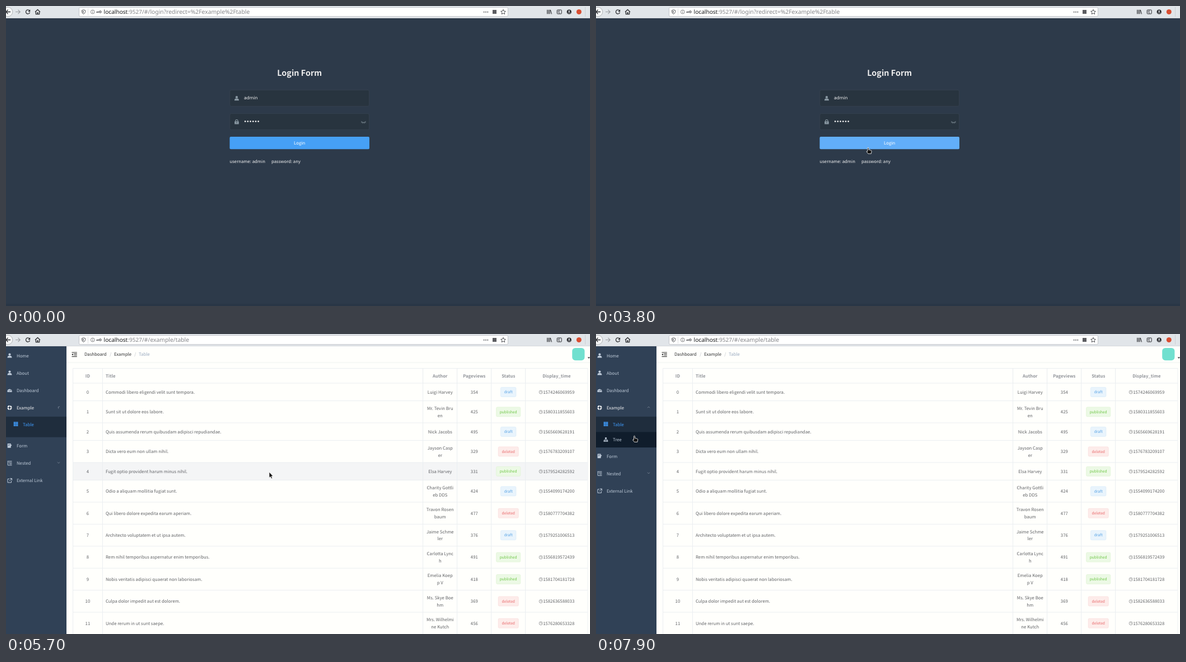
Animation of 1043 by 537 pixels, one loop 8000 ms. Source, as an HTML page:

```html
<!DOCTYPE html>
<html lang="en">
<head>
<meta charset="utf-8">
<title>Login and table</title>
<style>
html, body { margin: 0; width: 100%; height: 100%; overflow: hidden; background: #2d3a4a; }
svg { display: block; width: 100%; height: 100%; }
text { font-family: "Noto Sans CJK SC", "Noto Sans CJK JP", "Noto Sans CJK", "Noto Sans", sans-serif;
  text-rendering: geometricPrecision; white-space: pre; }
.url { font-family: "Noto Sans", sans-serif; }
.field { font-family: "DejaVu Sans", sans-serif; }
</style>
</head>
<body>
<svg id="stage" viewBox="0 0 1043 537"></svg>
<script>
const LOOP = 8000;
const SIZE = 7.77;
const PAGE = '#fffffc';
const LINE = '#ebeef1';

// Markup helpers; text is placed by the middle of its capitals.
const rect = (x, y, w, h, fill, more = '') =>
  `<rect x="${x}" y="${y}" width="${w}" height="${h}" fill="${fill}" ${more}/>`;
const disc = (x, y, r, fill, more = '') => `<circle cx="${x}" cy="${y}" r="${r}" fill="${fill}" ${more}/>`;
const fillPath = (d, fill, more = '') => `<path d="${d}" fill="${fill}" ${more}/>`;
const stroke = (d, color, width = 1, more = '') =>
  `<path d="${d}" fill="none" stroke="${color}" stroke-width="${width}" ${more}/>`;
const text = (x, y, str, fill, size = SIZE, more = '') =>
  `<text x="${x}" y="${y + size * 0.36}" fill="${fill}" font-size="${size}" ${more}>${str}</text>`;
const centered = (x, y, str, fill, size = SIZE, more = '') =>
  text(x, y, str, fill, size, 'text-anchor="middle" ' + more);
const group = (id, body, more = '') => `<g id="${id}" ${more}>${body}</g>`;
const person = (x, y, fill) =>
  disc(x, y - 2, 2.1, fill) + fillPath(`M${x - 4} ${y + 4}q0-3.6 2.8-3.6h2.4q2.8 0 2.8 3.6z`, fill);

function browserBar() {
  const ink = '#2b2c30';
  const url = (id, path) => group(id, text(243, 10.3, path, '#85868a', 10.35, 'class="url"'));
  return rect(0, 0, 1043, 22, '#e1e5e9') + rect(0, 21.4, 1043, 0.6, '#cdd1d5')
    + rect(31, 2, 15, 16, '#c8ccd0', 'id="reloadHover" rx="2"')
    + rect(49, 3, 15, 15, '#c5c8cb', 'id="homeHover" rx="2"')
    + disc(3.5, 10.5, 8.3, '#f5f6f7', 'stroke="#a4a6a9" stroke-width=".8"')
    + stroke('M8 10.5H0M3.5 6.8L-.2 10.5 3.5 14.2', ink, 1.3)
    + stroke('M17 10.5h8M21.5 6.8l3.7 3.7-3.7 3.7', '#9a9da1', 1.2)
    + stroke('M41.9 8.2A3.6 3.6 0 1 0 42.5 11.5', ink, 1.3) + fillPath('M43.2 6.3v4h-4z', ink)
    + stroke('M52 10.8l4.5-4.3 4.5 4.3M53.4 10.5v4.1h6.2v-4.1', ink, 1.3) + rect(55.5, 11, 2, 3.5, ink)
    + rect(130.5, 2.5, 766, 16.2, '#fff', 'rx="2" stroke="#b9bcc0" stroke-width=".8"')
    + stroke('M138.5 6.8l3 1v2.6q0 2.7-3 4-3-1.3-3-4v-2.6z', '#55565a', 1)
    + fillPath('M138.5 8.4v4.5q-1.6-.9-1.6-2.7v-1.3z', '#55565a')
    + stroke('M146.5 4v13', '#d4d5d7', 0.7)
    + disc(154.8, 10.5, 3.4, 'none', 'stroke="#66676a" stroke-width=".8"')
    + stroke('M154.8 9.8v2.7M154.8 8.2v.9', '#66676a', 0.9)
    + disc(168.4, 10.6, 1.7, 'none', 'stroke="#55565a" stroke-width="1.1"')
    + stroke('M166.7 10.6h-4.7v1.7M164.2 10.6v1.5', '#55565a', 1.1)
    + text(174.6, 10.3, 'localhost', '#17181b', 10.1, 'class="url"')
    + text(217.3, 10.3, ':9527', '#85868a', 10, 'class="url"')
    + url('loginUrl', '/#/login?redirect=%2Fexample%2Ftable') + url('tableUrl', '/#/example/table')
    + [853.7, 857, 860.3].map(x => disc(x, 10.7, 1, '#55565a')).join('')
    + rect(869, 7, 7, 7, '#5c5d61')
    + stroke('M888 6.3l1.3 2.8 3 .4-2.2 2.1.6 3-2.7-1.5-2.7 1.5.6-3-2.2-2.1 3-.4z', '#4c4d51', 1)
    + stroke('M966.7 6.8v7.5M968.9 6.8v7.5M971.1 6.8v7.5M972.3 7l2.2 7.3', ink, 1.1)
    + rect(984.2, 7, 8, 7, 'none', `rx="1" stroke="${ink}"`) + stroke('M988 7v7M985.5 9.2h1.6M985.5 11h1.6', ink, 0.8)
    + disc(1005.7, 10.5, 4.1, ink) + disc(1005.7, 9.4, 1.3, '#e1e5e9')
    + stroke('M1003.3 12.7q2.4-1.6 4.8 0', '#e1e5e9', 0.9)
    + disc(1023.3, 10.5, 4.5, '#d84d31') + stroke('M1034.5 2v17', '#c4c8cc', 0.7);
}

function loginPage() {
  const icon = '#8998a2';
  const box = y => rect(399.8, y, 248.8, 29, '#28343f', 'rx="2.5" stroke="#3a4653" stroke-width=".7"');
  return rect(0, 22, 1043, 515, '#2d3a4a') + rect(0, 533, 1043, 4, '#293646')
    + centered(524.2, 120, 'Login Form', '#eee', 14.43, 'font-weight="700"')
    + box(150.4) + box(192.6) + person(412, 165.2, icon)
    + text(425, 164.1, 'admin', '#f4f4f4', SIZE, 'class="field"')
    + rect(408.2, 206.6, 7.6, 5, icon, 'rx=".7"') + stroke('M409.8 207v-1.3a2.2 2.2 0 0 1 4.4 0v1.3', icon, 1.1)
    + disc(412, 208.8, 0.8, '#28343f')
    + [0, 1, 2, 3, 4, 5].map(i => disc(427.2 + i * 4.7, 206.6, 1.35, '#f4f4f4')).join('')
    + stroke('M634.3 206.5q4.2 4 8.4 0M635.5 208l-.9 1.2M637.3 208.8l-.4 1.5M639.7 208.8l.4 1.5M641.5 208l.9 1.2', icon, 0.9)
    + rect(399.5, 234, 249.5, 22.2, '#46a0f6', 'id="button" rx="2"')
    + centered(524.2, 244.7, 'Login', '#fff', 7.9)
    + text(399.5, 278.2, 'username: admin', '#f5f5f5') + text(474, 278.2, 'password: any', '#f5f5f5')
    + rect(0, 21.5, 70, 1.7, '#29a2e6', 'id="progress"');
}

// Sidebar geometry
const ITEM = 31.08, SUB = 27.75, MENU_TOP = 23.4, SUB_TOP = MENU_TOP + 4 * ITEM;
const MENU = '#bfcbd9';

function menuIcon(name, y) {
  switch (name) {
    case 'Dashboard':
      return fillPath(`M2.5 ${y + 3}a4.2 4.2 0 1 1 8 0z`, MENU) + stroke(`M6.5 ${y + 1.8}l1.5-3.3M3.8 ${y + .5}h1M8.8 ${y + .5}h1`, '#304156', 0.8);
    case 'Example':
      return disc(6.5, y - 0.3, 3, 'none', 'id="exampleIcon" stroke-width="2.2" stroke-dasharray="3.7 1" stroke-dashoffset="-.5"');
    case 'Form':
      return rect(2.7, y - 4.3, 6, 7.8, MENU, 'rx=".6"') + stroke(`M4 ${y - 2.4}h3.3M4 ${y - .6}h2`, '#304156', 0.7)
        + stroke(`M6.3 ${y + 2}l3.7-3.7`, MENU, 1.4);
    case 'Nested':
      return stroke(`M2.5 ${y - 3.6}h8M4.8 ${y - 1.2}h5.7M6 ${y + 1.2}h4.5M4.8 ${y + 3.6}h5.7M3.3 ${y - 3}v6.6h1.5`, MENU, 1);
    case 'External Link':
      return stroke(`M6 ${y - 3}h-3v6.5h6.5v-3M7 ${y - 3.8}h3.5v3.5M10.4 ${y - 3.7}l-4.4 4.4`, MENU, 1);
    default:
      return person(6.5, y - 0.4, MENU);
  }
}

function sidebar() {
  const item = (name, i) => {
    const top = MENU_TOP + i * ITEM, y = top + ITEM / 2;
    const arrow = name === 'Example' || name === 'Nested'
      ? stroke(`M91.8 ${y - 2}l2.2 2 2.2-2`, '#7c8a9a', 0.8, `id="arrow${name}"`) : '';
    return rect(0, top, 108, ITEM, '#263445', `id="hover${i}"`) + menuIcon(name, y)
      + text(19, y + 0.2, name, MENU, SIZE, `id="label${name[0] + i}"`) + arrow;
  };
  const items = ['Home', 'About', 'Dashboard', 'Example', 'Form', 'Nested', 'External Link'].map(item);
  const grid = [0, 1, 2].map(r => [0, 1, 2].map(c => rect(13.7 + c * 2.7, 157.3 + r * 2.7, 2.3, 2.3, '#409eff')).join('')).join('');
  const tree = rect(16.1, 185.2, 3, 2.6, MENU) + stroke('M17.6 187v2.2M14.9 191v-1.9h5.4v1.9', MENU, 0.8)
    + [13.7, 16.4, 19.1].map(x => rect(x, 190.4, 2.2, 2.4, MENU)).join('');
  const submenu = rect(0, SUB_TOP, 108, 2 * SUB, '#1f2d3d')
    + rect(0, SUB_TOP, 108, SUB, '#101d2c', 'id="hoverTable"')
    + rect(0, SUB_TOP + SUB, 108, SUB, '#101d2c', 'id="hoverTree"')
    + grid + text(30, 161.8, 'Table', '#409eff') + tree + text(30, 189.5, 'Tree', MENU);
  return rect(0, 22, 108, 515, '#304156') + items.slice(0, 4).join('')
    + `<clipPath id="fold">${rect(0, SUB_TOP, 108, 0, '#000', 'id="foldBox"')}</clipPath>`
    + group('submenu', submenu, 'clip-path="url(#fold)"') + group('lowerMenu', items.slice(4).join(''));
}

function navbar() {
  const crumb = (x, str, fill) => text(x, 36.6, str, fill);
  return rect(108, 50.4, 935, 1, '#f1f2f1') + rect(108, 51.4, 935, 1, '#f9faf8')
    + stroke('M117.5 33h9.3M121.3 35.5h5.5M121.3 38h5.5M117.5 40.5h9.3', '#222', 1)
    + fillPath('M119.8 34.8v4l-2.4-2z', '#222')
    + crumb(140, 'Dashboard', '#303133') + crumb(185.2, '/', '#b6bac2') + crumb(193, 'Example', '#303133')
    + crumb(229.2, '/', '#b6bac2') + crumb(237, 'Table', '#97a8be')
    + rect(1011.2, 25, 22.2, 22.2, '#70e0cf', 'id="avatar" rx="5.5"')
    + fillPath('M1038.6 41.6h4.6l-2.3 2.4z', '#303133', 'id="caret"');
}

const TOP = 61.5, HEAD = 88, TABLE_LEFT = 119.6;
const COLUMNS = [744.6, 805.6, 866.6, 927.6];

const header = () => {
  const head = (x, str) => centered(x, 75.2, str, '#909399', SIZE, 'font-weight="700"');
  return stroke(`M${TABLE_LEFT} ${TOP}H1043M${TABLE_LEFT} ${HEAD}H1043M172.5 ${TOP}V${HEAD}`, LINE)
    + head(145.9, 'ID') + text(178, 75.2, 'Title', '#909399', SIZE, 'font-weight="700"')
    + group('rightHead', COLUMNS.map(x => stroke(`M${x} ${TOP}V${HEAD}`, LINE)).join('')
      + head(775.3, 'Author') + head(836.3, 'Pageviews') + head(897.3, 'Status') + head(983.3, 'Display_time'));
};

const TAGS = {
  draft: [27.4, '#509fe3', '#e9f4fc', '#d3e8f9'],
  published: [43.2, '#6cc644', '#ecf9e5', '#dcf2d1'],
  deleted: [36, '#e8696b', '#fdecea', '#f9d9d8'],
};

// Title | author (slash breaks the line) | views | status | time
const ROWS = `Commodi libero eligendi velit sunt tempora.|Luigi Harvey|354|draft|1574246069959
Sunt sit ut dolore eos labore.|Mr. Tevin Bru/en|425|published|1580311855603
Quis assumenda rerum quibusdam adipisci repudiandae.|Nick Jacobs|495|draft|1565669628191
Dicta vero eum non ullam nihil.|Jayson Casp/er|329|deleted|1576783209107
Fugit optio provident harum minus nihil.|Elsa Harvey|331|published|1579524282592
Odio a aliquam mollitia fugiat sunt.|Charity Gottli/eb DDS|424|draft|1554099174200
Qui libero dolore expedita earum aperiam.|Travon Rosen/baum|477|deleted|1580777704382
Architecto voluptatem et ut ipsa autem.|Jaime Schme/ler|376|draft|1579251006513
Rem nihil temporibus aspernatur enim temporibus.|Carlotta Lync/h|491|published|1556819572439
Nobis veritatis adipisci quaerat non laboriosam.|Emelia Koep/p V|418|published|1581704181728
Culpa dolor impedit aut est dolorem.|Ms. Skye Boe/hm|369|deleted|1582636588033
Unde rerum in ut sunt saepe.|Mrs. Wilhelmi/ne Kutch|456|deleted|1576280653328`
  .split('\n').map(line => line.split('|'));
let edge = HEAD;
const BANDS = ROWS.map(row => ({ top: edge, bottom: edge += row[1].includes('/') ? 39.4 : 31.6 }));

function tableRows() {
  const ink = '#606266';
  const body = ROWS.map(([title, author, views, status, time], i) => {
    const { top, bottom } = BANDS[i], y = (top + bottom) / 2 + 0.2;
    const [w, color, bg, border] = TAGS[status];
    const lines = author.split('/');
    return stroke(`M${TABLE_LEFT} ${bottom}H1039`, LINE)
      + centered(145.9, y, i, ink) + text(178, y, title, ink)
      + lines.map((part, n) => centered(775.3, y + (n - (lines.length - 1) / 2) * 12.8, part, ink)).join('')
      + centered(836.3, y, views, ink)
      + rect(897.2 - w / 2, y - 8.6, w, 17, bg, `rx="2" stroke="${border}" stroke-width=".6"`)
      + centered(897.2, y - 0.2, status, color, 6.66)
      + disc(955.2, y, 3, 'none', `stroke="${ink}" stroke-width=".6"`)
      + stroke(`M955.2 ${y - 1.9}v2h1.7`, ink, 0.6) + text(959.2, y, time, ink);
  }).join('');
  return body + stroke([TABLE_LEFT, 172.5, ...COLUMNS, 1039].map(x => `M${x} ${TOP}V537`).join(''), LINE)
    + rect(1039.6, 60, 4, 477, PAGE);
}

const outline = 'stroke="#fff" stroke-width=".8" stroke-linejoin="round"';
document.getElementById('stage').innerHTML = browserBar() + group('login', loginPage())
  + group('app', rect(108, 22, 935, 515, PAGE) + sidebar() + navbar()
    + rect(TABLE_LEFT, 0, 919.4, 0, '#f4f5f6', 'id="rowHover"') + header()
    + group('empty', centered(582.7, 105.2, 'No Data', '#909399') + stroke(`M${TABLE_LEFT} 121.5H1043`, LINE))
    + group('rows', tableRows()))
  + group('cursor',
    fillPath('M0 0V10.4L2.3 8.3 3.9 12 5.7 11.2 4.2 7.6H7.2Z', '#111', `id="arrow" ${outline}`)
    + fillPath('M-1 .9Q0-.6 1 .9V4.4L5 5.3Q6.4 5.7 6.2 7.3L5.4 11.4H0L-2.8 7.8Q-2.7 6.2-1 7.2Z', '#111', `id="hand" ${outline}`));

const parts = Object.fromEntries([...document.querySelectorAll('[id]')].map(node => [node.id, node]));
const set = (id, name, value) => parts[id].setAttribute(name, value);
const show = (id, on) => set(id, 'visibility', on ? 'inherit' : 'hidden');
const move = (id, x, y) => set(id, 'transform', `translate(${x} ${y})`);

// Time, x, y; a trailing 1 eases the way to that point.
const PATH = [
  [800, 39, 9], [1000, 26, 31], [1200, 38, 7], [2000, 53, 15], [2500, 354, 187, 1], [2600, 354, 187],
  [3000, 462, 235], [3300, 482.5, 243.5], [3400, 482.5, 243.5], [3800, 486, 253],
  [5500, 486, 253], [6400, 359, 206, 1], [7300, 60, 130, 1], [7900, 68.5, 182],
];

function cursorAt(t) {
  const next = PATH.findIndex(key => key[0] > t);
  if (next < 0) return PATH[PATH.length - 1].slice(1, 3);
  if (next === 0) return [-50, -50];
  const [t0, x0, y0] = PATH[next - 1], [t1, x1, y1, eased] = PATH[next];
  let k = (t - t0) / (t1 - t0);
  if (eased) k = k * k * (3 - 2 * k);
  return [x0 + (x1 - x0) * k, y0 + (y1 - y0) * k];
}

function draw(time) {
  const t = Math.floor(time / 100) * 100;
  const [x, y] = cursorAt(t);
  const visible = t >= 800 && t < 1300 || t >= 2000;
  const inApp = t >= 5000, loaded = t >= 5600;
  const within = (top, bottom) => visible && y >= top && y < bottom;
  const onButton = !inApp && x > 399 && x < 649 && within(234, 257);
  const onMenu = inApp && x < 108;

  show('login', !inApp);
  show('app', inApp);
  show('loginUrl', t < 4900);
  show('tableUrl', t >= 4900);
  show('progress', t >= 4900 && !inApp);
  show('reloadHover', x > 31 && x < 46 && within(2, 18));
  show('homeHover', x > 49 && x < 64 && within(3, 18));
  set('button', 'fill', t >= 4800 ? '#4998e4' : onButton ? '#62aef9' : '#46a0f6');

  const open = Math.min(1, Math.max(0, (t - 5500) / 300));
  set('foldBox', 'height', 2 * SUB * open);
  move('lowerMenu', 0, 2 * SUB * open);
  const mid = MENU_TOP + 3.5 * ITEM - 1;
  set('arrowExample', 'transform', `rotate(${180 * open} 94 ${mid})`);
  set('labelE3', 'fill', loaded ? '#f4f4f5' : MENU);
  set('exampleIcon', 'stroke', loaded ? '#f4f4f5' : MENU);
  for (let i = 0; i < 7; i++) {
    const top = MENU_TOP + i * ITEM + (i > 3 ? 2 * SUB * open : 0);
    show('hover' + i, onMenu && within(top, top + ITEM));
  }
  show('hoverTable', onMenu && within(SUB_TOP, SUB_TOP + SUB));
  show('hoverTree', onMenu && within(SUB_TOP + SUB, SUB_TOP + 2 * SUB));

  const shift = loaded ? 0 : 7;
  move('rightHead', shift, 0);
  move('avatar', shift, 0);
  show('caret', loaded);
  show('empty', !loaded);
  show('rows', loaded);
  const band = loaded && x > TABLE_LEFT && BANDS.find(b => within(b.top, b.bottom));
  set('rowHover', 'y', band ? band.top : 0);
  set('rowHover', 'height', band ? band.bottom - band.top : 0);

  show('cursor', visible);
  show('hand', onButton || onMenu);
  show('arrow', !(onButton || onMenu));
  move('cursor', x, y);
}

const start = performance.now();
function tick() {
  draw((performance.now() - start) % LOOP);
  requestAnimationFrame(tick);
}
tick();
</script>
</body>
</html>
```
